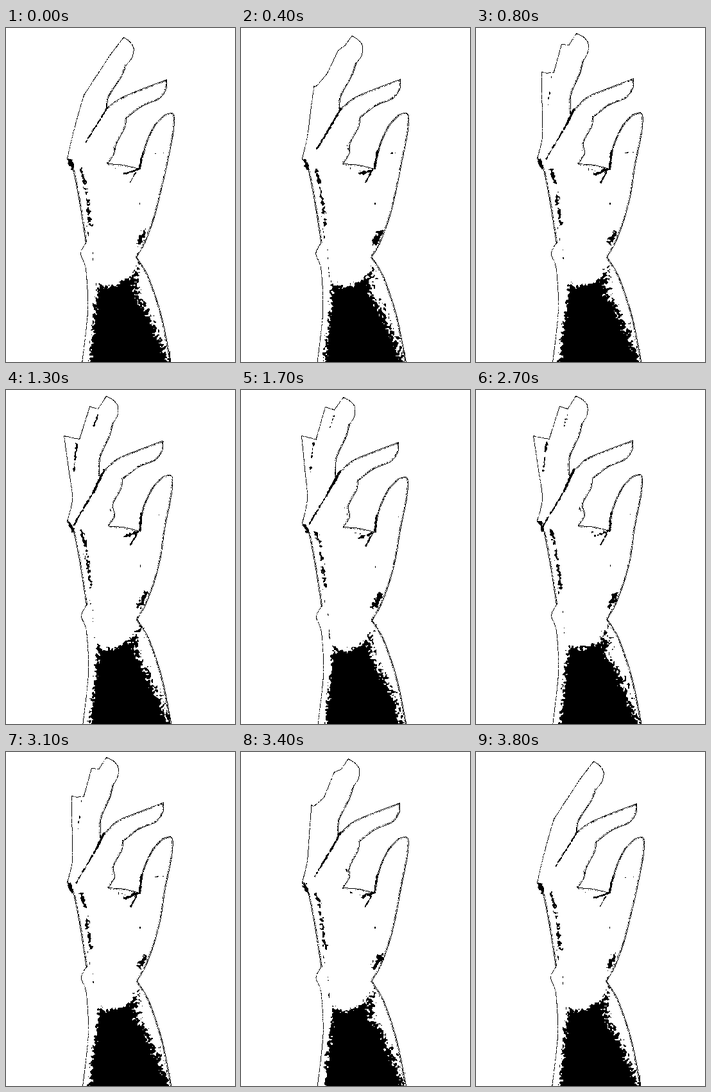
Animation, 357 px wide and 520 px high, one loop 4 s. Source, as an HTML page with a canvas:

```html
<!DOCTYPE html>
<html lang="en">
<head>
<meta charset="utf-8">
<title>Hand</title>
<style>
html, body { margin: 0; width: 100%; height: 100%; overflow: hidden; background: #fff; }
canvas { display: block; }
</style>
</head>
<body>
<canvas id="stage" width="357" height="520"></canvas>
<script>
const ctx = document.getElementById('stage').getContext('2d');

// Tips of pinky, ring and middle finger, the web beside them,
// how far the fingers are open, and how far the hand has sunk
const poses = [
  { step: 0, keys: [121,104, 163,40, 183,14, 157,124, 0, 0] },
  { step: 7, keys: [102,68, 133,25, 156,8, 147,133, .8, 0] },
  { step: 11, keys: [89,71, 130,25, 155,9, 145,133, 1, 0] },
  { step: 16, keys: [94,71, 131,26, 159,11, 147,135, 1, 1] }
];
const eases = [
  u => u * u * (3 - 2 * u),
  u => u + .7 * Math.sin(Math.PI * u),
  u => Math.min(u, 1.1)
];

let seed = 0, count = 0;
function hash(i, j) {
  const s = Math.sin(i * 12.9898 + j * 78.233 + seed * 3.717) * 43758.5453;
  return s - Math.floor(s);
}
const rnd = () => hash(count++, .5);
const mix = (a, b, u) => a + (b - a) * u;
const shift = (pts, dx, dy) => pts.map((v, i) => v + (i % 2 ? dy : dx));
const dot = (x, y) => ctx.fillRect(Math.round(x), Math.round(y), 1, 1);

// Smooth clumpy noise from -1 to 1
function noise(x, y) {
  x /= 2.5;
  y /= 2.5;
  const i = Math.floor(x), j = Math.floor(y), u = x - i;
  const row = k => mix(hash(i, k), hash(i + 1, k), u);
  return 2 * mix(row(j), row(j + 1), y - j) - 1;
}

// Dotted line along a smooth curve, with a second one on its inner side
function line(pts, keep, inner = 0) {
  const n = pts.length / 2;
  const point = i => {
    const k = 2 * Math.min(n - 1, Math.max(0, i));
    return [pts[k], pts[k + 1]];
  };
  for (let i = 0; i < n - 1; i++) {
    const a = point(i - 1), b = point(i), c = point(i + 1), d = point(i + 2);
    const dx = c[0] - b[0], dy = c[1] - b[1], len = Math.hypot(dx, dy) || 1;
    for (let s = 0; s < len; s += .8) {
      const u = s / len, v = 1 - u;
      const at = k => b[k] * v * v * (1 + 2 * u) + c[k] * u * u * (1 + 2 * v)
        + .42 * u * v * (v * (c[k] - a[k]) - u * (d[k] - b[k]));
      const x = at(0), y = at(1);
      if (rnd() < keep) dot(x, y);
      if (rnd() < inner) dot(x - dy / len * 1.4, y + dx / len * 1.4);
    }
  }
}

// Ragged stroke: solid within w of the segment, frayed by noise
function smear([ax, ay, bx, by], w, rough) {
  const pad = w + rough, dx = bx - ax, dy = by - ay;
  for (let y = Math.floor(Math.min(ay, by) - pad); y <= Math.max(ay, by) + pad; y++) {
    for (let x = Math.floor(Math.min(ax, bx) - pad); x <= Math.max(ax, bx) + pad; x++) {
      const u = Math.max(0, Math.min(1, ((x - ax) * dx + (y - ay) * dy) / (dx * dx + dy * dy)));
      const d = Math.hypot(x - ax - u * dx, y - ay - u * dy);
      if (w - d + rough * noise(x, y) > 0) dot(x, y);
    }
  }
}

function forearm(dx, dy) {
  for (let y = 365; y < 520; y++) {
    for (let x = 122; x < 256; x++) {
      const px = x - dx, py = y - dy;
      const left = 143 - (py - 395) * .11;
      const right = 203 + 1.25 * Math.max(0, py - 415) ** .8;
      const top = 402 - 20 * ((px - 160) / 38) ** 2;
      const rough = px > right - 12 ? 12 : 6;
      if (Math.min(px - left, right - px, py - top) + rough * noise(x, y) > 0) dot(x, y);
    }
  }
}

function poseAt(step) {
  const k = step < 7 ? 0 : step < 11 ? 1 : 2;
  const a = poses[k], b = poses[k + 1];
  const u = eases[k]((step - a.step) / (b.step - a.step));
  return a.keys.map((v, i) => mix(v, b.keys[i], u));
}

function draw(step) {
  const [px, py, rx, ry, mx, my, wx, wy, open, sink] = poseAt(step);
  seed = step + 1;
  count = 0;
  ctx.fillStyle = '#fff';
  ctx.fillRect(0, 0, 357, 520);
  ctx.fillStyle = '#000';

  const knuckle = [95, 203 + 4 * sink];
  const pinky = [px, py], ring = [rx, ry], middle = [mx, my], web = [wx, wy];
  const notch = [(px + rx) / 2 + 4 * open, (py + ry) / 2 + 28 * open];
  const split = [(rx + mx) / 2, (ry + my) / 2 + 12 * open];
  const index = pts => shift(pts, sink - 6 * open, 3 * sink - 2 * open);
  const thumb = pts => shift(pts, sink - 3 * open, 4 * sink - open);
  const base = pts => shift(pts, open, 2 * sink);

  // The middle finger turns with its lean
  const lean = Math.atan2(mx - wx, wy - my) - .07;
  const cos = Math.cos(lean), sin = Math.sin(lean);
  const turn = (x, y) => [mx + x * cos - y * sin, my + x * sin + y * cos];
  const bend = turn(11, 42);

  // Upper fingers
  line([...knuckle, 103, 168, (103 + px) / 2, (165 + py) / 2, ...pinky], .85);
  line([...pinky, px + 9 * open, py + 2 * open, ...notch], .85);
  line([...notch, ...ring], .85);
  line([...ring, ...split], .85);
  line([...split, ...middle], .85);
  line([...middle, ...turn(10, 5), ...turn(18, 14), ...turn(18, 29), ...bend], .9);
  line([...bend, ...turn(6, 62), ...turn(-8, 95), ...web], .98, .5);

  // Index finger and thumb
  const indexTip = index([250, 80]), root = base([158, 211]), pit = base([207, 219]);
  line([...web, ...index([176,110, 210,95]), ...indexTip], .95, .45);
  line([...indexTip, ...index([249,95, 238,110, 212,121, 187,140])], .95, .45);
  line([...index([187,140, 185,154, 172,179]), ...base([168, 195]), ...root], .95, .3);
  line([...root, ...base([183, 213]), ...pit], .98, .3);
  line([...pit, ...thumb([213,195, 219,175, 231,151, 246,135])], .98, .8);
  line([...thumb([246,135, 258,132, 262,139, 260,165, 250,215]),
    ...base([240,258, 230,297, 216,334, 203,356])], .95, .45);

  // Wrist and arm
  line(base([203,356, 222,388, 242,448, 257,522]), .95, .5);
  line(base([118,522, 127,440, 124,375, 116,351, 124,334]), .8);
  line([...base([124,334, 114,270, 104,220]), ...knuckle], .95, .5);

  // Crease below the index finger, then shadows between the fingers
  const fold = [mix(140, 136, open), mix(152, 158, open)];
  smear([wx + 7 * open, wy - 9 * open, ...fold], 1 + .8 * open, 1);
  smear([...fold, mix(124, 105, open), mix(177, 210, open)], 1, 1.2);
  smear([notch[0] - 4, notch[1] + 6, notch[0] - 9, notch[1] + 50], 6 * open - 5, 2.2);
  smear([split[0] - 1, split[1] + 10, split[0] - 6, split[1] + 26], 6 * open - 5.4, 2);
  smear(index([166,182, 170,192]), 0, 2);

  // Back of the hand
  smear(shift([4,3, 8,14], ...knuckle), 2.4, 2.5);
  smear(base([116,220, 122,240]), 2, 3);
  smear(base([123,250, 131,306]), 1.2, 4);
  smear(base([126,308, 130,332]), -.8, 2.5);

  // Web of the thumb
  smear([...pit, ...thumb([213, 192])], 1.4, 1.2);
  smear(base([184,227, 204,220]), 1.6, 2.2);
  smear(base([202,224, 193,240]), 1, 1);
  smear(base([170,218, 184,222]), -.6, 2.5);

  // Palm and wrist
  smear(thumb([232,195, 246,194]), -.6, 2.2);
  smear(base([208,272, 208,274]), 1, 0);
  smear(base([216,318, 207,334]), 3.4, 5);
  smear(base([134,342, 137,390]), -.6, 2);
  forearm(open, 3 * sink);
}

let shown = -1;
function frame(now) {
  const t = now % 4000;
  // The second half plays the first one backwards
  const half = t < 2000 ? t : 3999.999 - t;
  const step = Math.max(0, Math.floor(half / 100) - 1);
  if (step !== shown) draw(shown = step);
  requestAnimationFrame(frame);
}
draw(shown = 0);
requestAnimationFrame(frame);
</script>
</body>
</html>
```
